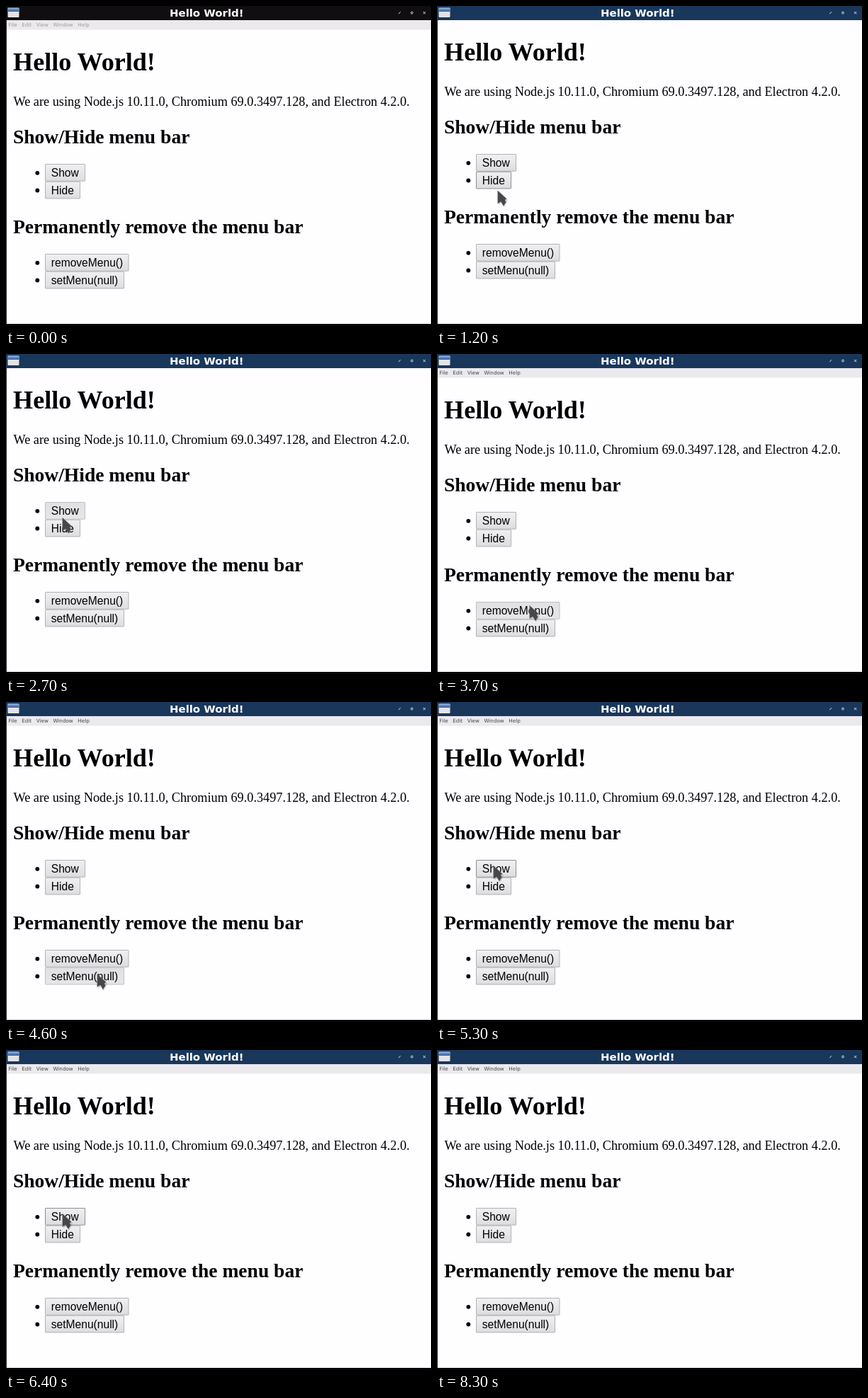
An HTML page for the animation above (8600 ms loop, 600 px wide and 452 px high).

```html
<!DOCTYPE html>
<html lang="en">
<head>
<meta charset="utf-8">
<title>Hello World!</title>
<style>
html, body { margin: 0; width: 100%; height: 100%; overflow: hidden; background: #fefdff; }
svg { display: block; width: 100vw; height: 100vh; }
text { white-space: pre; }
.title { font: bold 14.95px "DejaVu Sans", sans-serif; fill: #fff; }
.menu { font: 7.2px "DejaVu Sans", sans-serif; }
.h1 { font: bold 36.1px "Liberation Serif", serif; }
.h2 { font: bold 27.55px "Liberation Serif", serif; }
.p { font: 18.25px "Liberation Serif", serif; }
.label { font: 15.6px "Liberation Sans", sans-serif; }
</style>
</head>
<body>
<svg id="stage" viewBox="0 0 600 452" xmlns="http://www.w3.org/2000/svg">
  <defs>
    <linearGradient id="face" x2="0" y2="1">
      <stop offset="0" stop-color="#f0eff1"/><stop offset="1" stop-color="#dddcdf"/>
    </linearGradient>
    <linearGradient id="pressed" x2="0" y2="1">
      <stop offset="0" stop-color="#e2e0e4"/><stop offset="1" stop-color="#e6e5e8"/>
    </linearGradient>
    <linearGradient id="blue" x2="0" y2="1">
      <stop offset="0" stop-color="#7fa3d6"/><stop offset="1" stop-color="#2f5c9f"/>
    </linearGradient>
  </defs>
  <rect width="600" height="452" fill="#fefdff"/>
  <g id="menu"><rect y="19" width="600" height="14.5" fill="#ece9ed"/></g>
  <g id="page">
    <text class="h1" x="10.1" y="91">Hello World!</text>
    <text class="p" x="10.4" y="140.5">We are using Node.js 10.11.0, Chromium 69.0.3497.128, and Electron 4.2.0.</text>
    <text class="h2" x="9.9" y="193.8">Show/Hide menu bar</text>
    <text class="h2" x="9.9" y="321.2">Permanently remove the menu bar</text>
  </g>
  <rect id="bar" width="600" height="20"/>
  <rect x="2.5" y="2.5" width="16" height="13.5" rx="1" fill="#e2e2e6"/>
  <rect x="2.5" y="3.2" width="16" height="4.8" fill="url(#blue)"/>
  <text class="title" x="231" y="14.5">Hello World!</text>
  <g fill="none" stroke="#dfe3ea">
    <path d="M554.3 11.2l2.6-3M589 8l3.2 3.2M592.2 8l-3.2 3.2"/>
    <circle cx="573" cy="9.6" r="1.4"/>
  </g>
  <path d="M0 20h1V450H0z" fill="#2b2b30"/>
  <rect y="449" width="600" height="3" fill="#08070a"/>
  <g id="cursor">
    <path d="M1 3V21L5 18L9 24L13 17L14 13Z" fill="#000" opacity=".13"/>
    <path d="M-.4 0V18.8L4.2 16L8 22.3L11.6 16.4L10 13.4L12.4 11.8Z" fill="#47474a" stroke="#aaaaad" stroke-width=".4" stroke-linejoin="round"/>
  </g>
</svg>
<script>
const LOOP = 8600, STEP = 100, FOCUS = 1100, MENU_H = 14, ROW = 24.7;
const SHOW = 0, HIDE = 1, REMOVE = 2, SET = 3;
const $ = id => document.getElementById(id);

function add(parent, tag, attrs, text) {
  const el = document.createElementNS("http://www.w3.org/2000/svg", tag);
  for (const k in attrs) el.setAttribute(k, attrs[k]);
  if (text) el.textContent = text;
  return parent.appendChild(el);
}

// One text run: word gaps keep the menu items evenly apart
const menuText = add($("menu"), "text", { class: "menu", x: 3.6, y: 29 });
["File", "Edit", "View", "Window", "Help"].forEach((s, i) =>
  add(menuText, "tspan", { dx: i ? 6.6 : 0 }, s));

const buttons = [["Show", 57], ["Hide", 50], ["removeMenu()", 118.5], ["setMenu(null)", 112]].map(([s, w], i) => {
  const y = (i < REMOVE ? 223 : 350) + i % 2 * ROW;
  add($("page"), "circle", { cx: 44.3, cy: y + 12.8, r: 2.9 });
  const face = add($("page"), "rect", { x: 55.5, y: y + .5, width: w - 1, height: ROW - 1, rx: .5 });
  add($("page"), "text", { class: "label", x: 63.8, y: y + 17.8 }, s);
  return { y, w, face };
});

// Where the pointer rests on each button, and where it enters and leaves
const rest = [[80, 231], [86, 260.5], [131, 355], [129, 384]];
const enter = [428, 150], exit = [484, 164];

// Pointer trips: leave, arrive, place
const trips = [
  [100, 900, rest[HIDE]], [1200, 1400, rest[SHOW]], [1600, 2000, rest[HIDE]],
  [2300, 2600, rest[SHOW]], [2800, 3400, rest[REMOVE]], [3900, 4200, rest[SET]],
  [4700, 5200, rest[SHOW]], [5600, 5900, rest[HIDE]], [6000, 6200, rest[SHOW]], [6500, 7100, exit]
];
const clicks = [[1100, HIDE], [1500, SHOW], [2200, HIDE], [2700, SHOW],
  [3700, REMOVE], [4600, SET], [6000, HIDE], [6200, SHOW]];

const lastClick = t => clicks.filter(c => c[0] <= t).pop() || [-STEP, SHOW];
const shift = t => lastClick(t - STEP)[1] === HIDE ? -MENU_H : 0;

function pointer(t) {
  if (t < trips[0][0] || t > trips[trips.length - 1][1]) return null;
  let [x, y] = enter;
  for (const [leave, arrive, to] of trips) {
    const u = Math.min(1, Math.max(0, (t - leave) / (arrive - leave)));
    const e = u * (2 - u);
    x += (to[0] - x) * e;
    y += (to[1] - y) * e;
  }
  return [x, y];
}

function draw(t) {
  const active = t >= FOCUS, dy = shift(t), pos = pointer(t);
  $("bar").setAttribute("fill", active ? "#19375b" : "#110e11");
  $("menu").style.display = dy ? "none" : "";
  menuText.setAttribute("fill", active ? "#444446" : "#9c9b9d");
  $("page").setAttribute("transform", `translate(0 ${dy})`);

  // Hover follows a layout change one step late
  const off = shift(t - STEP), [clickTime, clicked] = lastClick(t);
  buttons.forEach(({ y, w, face }, i) => {
    const top = y + off;
    const over = pos && pos[0] >= 55 && pos[0] < 55 + w && pos[1] >= top && pos[1] < top + ROW;
    const down = i === clicked && t < clickTime + STEP;
    face.setAttribute("fill", down ? "url(#pressed)" : "url(#face)");
    face.setAttribute("stroke", down ? "#c0bfc2" : over ? "#8e8d90" : "#b2b1b4");
  });

  $("cursor").style.display = pos ? "" : "none";
  if (pos) $("cursor").setAttribute("transform", `translate(${pos[0]} ${pos[1]})`);
}

const start = performance.now();
function tick() {
  const t = (performance.now() - start) % LOOP;
  draw(Math.floor(t / STEP) * STEP);
  requestAnimationFrame(tick);
}
tick();
</script>
</body>
</html>
```
